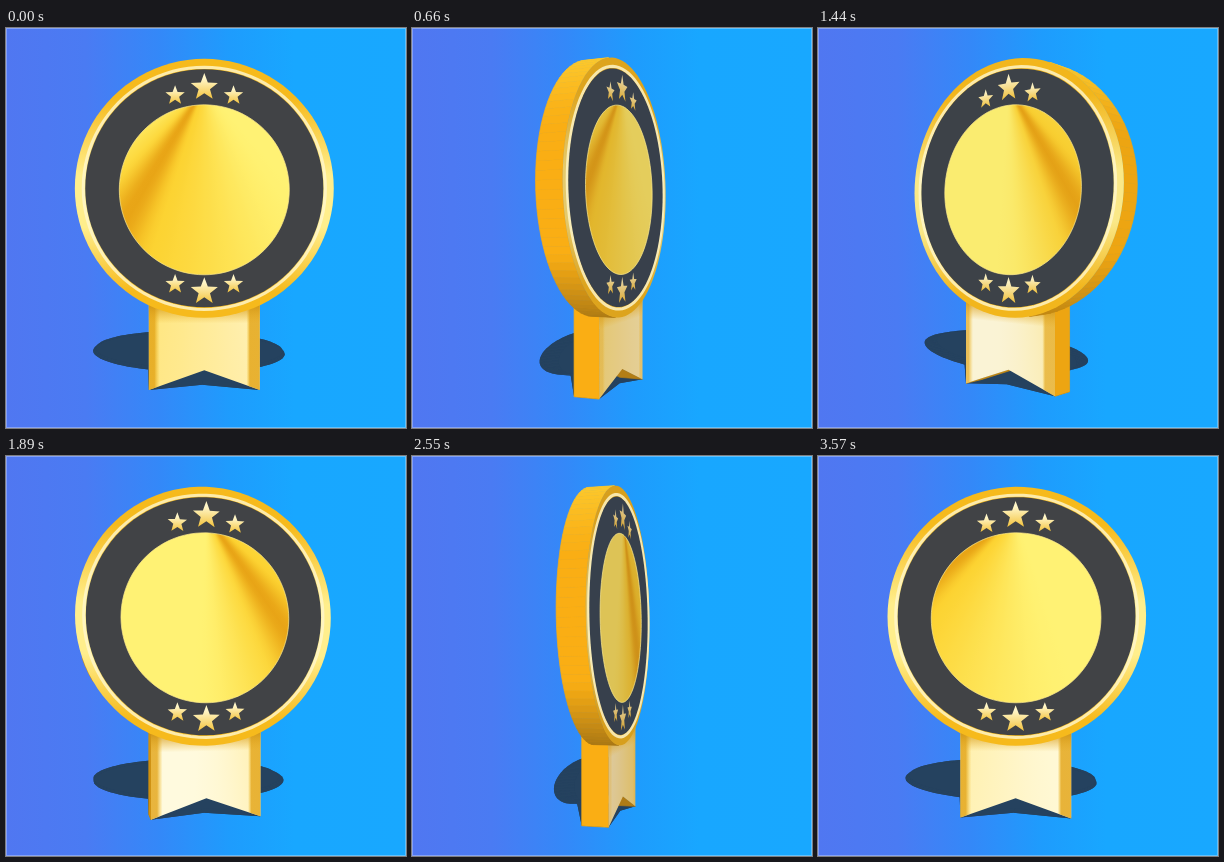
Write an HTML page with a canvas that moves like this. It is 400 px wide and 400 px high and loops after 3.6 s.

```html
<!DOCTYPE html>
<html lang="en">
<head>
<meta charset="utf-8">
<title>Turning medal</title>
<style>
  html, body { margin: 0; width: 100%; height: 100%; overflow: hidden; background: #18a7ff; }
  canvas { display: block; width: 400px; height: 400px; }
</style>
</head>
<body>
<canvas id="stage" width="400" height="400"></canvas>
<script>
const ctx = document.getElementById('stage').getContext('2d');
const LOOP = 3600, STEP = 30, TURN = 1800;
const AXIS = 198.3, HORIZON = 213, DEPTH = 745;
const HALF = 13, FLOOR = 359.4, MID = 161.2;
const RIM = 127.2, RING = 117, DISC = 83.5;
const POLE = 60, PERIOD = 165;
let sin = 0, cos = 1;

const rgb = c => `rgb(${c.map(Math.round).join()})`;
const mix = (a, b, k) => a.map((v, i) => v + (b[i] - v) * k);
const clamp = v => Math.min(1, Math.max(0, v));
const smooth = v => { v = clamp(v); return v * v * (3 - 2 * v); };

// Model point to world: turn around the vertical axis.
const turn = (x, y, z) => [x * cos + z * sin, y, z * cos - x * sin];

function project([x, y, z]) {
  const s = DEPTH / (DEPTH - z);
  return [AXIS + x * s, HORIZON + (y - HORIZON) * s];
}

// World point dropped along the light onto the floor.
function drop([x, y, z]) {
  const h = FLOOR - y;
  return [x - 0.115 * h, FLOOR, z - 1.4 * h];
}

const toScreen = (x, y, z) => project(turn(x, y, z));
const toShadow = (x, y, z) => project(drop(turn(x, y, z)));

function trace(pts) {
  ctx.beginPath();
  pts.forEach(p => ctx.lineTo(p[0], p[1]));
  ctx.closePath();
}

function area(pts) {
  return pts.reduce((sum, p, i) => {
    const q = pts[(i + 1) % pts.length];
    return sum + p[0] * q[1] - q[0] * p[1];
  }, 0);
}

function circle(r, cy = MID, n = 96) {
  return Array.from({ length: n }, (_, i) => {
    const a = i / n * 2 * Math.PI;
    return [r * Math.cos(a), cy + r * Math.sin(a)];
  });
}

function star(cx, cy, r) {
  return Array.from({ length: 10 }, (_, i) => {
    const a = i * Math.PI / 5 - Math.PI / 2, k = i % 2 ? r * 0.42 : r;
    return [cx + k * Math.cos(a), cy + k * Math.sin(a)];
  });
}

const rimShape = circle(RIM);
const ringShape = circle(RING);
const discShape = circle(DISC, MID + 1.5);
const ribbon = [[-54.5, 272], [54.5, 272], [54.5, FLOOR], [0, 340], [-54.5, FLOOR]];
const stars = [
  [-28.7, 70, 10], [0, 62, 14], [28.7, 70, 10],
  [-28.7, 255.5, 10], [0, 262.5, 14], [28.7, 255.5, 10]
];

const flat = (shape, z, map) => shape.map(p => map(p[0], p[1], z));

function eachWall(shape, map, draw) {
  shape.forEach((p, i) => {
    const q = shape[(i + 1) % shape.length];
    const quad = [map(...p, HALF), map(...p, -HALF), map(...q, -HALF), map(...q, HALF)];
    draw(quad, p, q);
  });
}

function castShadow(shape) {
  ctx.fillStyle = '#25425f';
  for (const z of [-HALF, HALF]) {
    trace(flat(shape, z, toShadow));
    ctx.fill();
  }
  eachWall(shape, toShadow, quad => { trace(quad); ctx.fill(); });
}

function drawWalls(shape) {
  const lit = mix([205, 142, 14], [250, 174, 20], smooth(Math.abs(sin) * 1.1));
  eachWall(shape, toScreen, (quad, p, q) => {
    if (area(quad) <= 0) return;
    const dx = q[0] - p[0], dy = q[1] - p[1];
    const down = -dx / Math.hypot(dx, dy);
    const upper = mix(lit, [252, 200, 44], smooth((-down - 0.3) * 1.4));
    ctx.fillStyle = ctx.strokeStyle = rgb(mix(upper, [140, 100, 22], clamp((down - 0.5) * 1.6) * Math.abs(sin)));
    ctx.lineWidth = 0.7;
    trace(quad);
    ctx.fill();
    ctx.stroke();
  });
}

// Run a paint job with coordinates lying on the front face.
function onFace(cy, paint) {
  const at = (x, y) => toScreen(x, y, HALF);
  const o = at(0, cy), l = at(-40, cy), r = at(40, cy), t = at(0, cy - 40), b = at(0, cy + 40);
  ctx.save();
  ctx.transform((r[0] - l[0]) / 80, (r[1] - l[1]) / 80,
    (b[0] - t[0]) / 80, (b[1] - t[1]) / 80, o[0], o[1]);
  paint();
  ctx.restore();
}

function addStops(g, stops) {
  stops.forEach(([at, color]) => g.addColorStop(at, color));
  return g;
}

const ramp = (x0, y0, x1, y1, stops) =>
  addStops(ctx.createLinearGradient(x0, y0, x1, y1), stops);

// Dark streaks that sweep around a point above the disc.
function sheen(cy, sweep, [dark, gold, light]) {
  const n = 72, stops = [];
  for (let i = 0; i <= n; i++) {
    const raw = 90 - i / n * 180 - sweep;
    const d = raw - PERIOD * Math.round(raw / PERIOD);
    const near = smooth(Math.abs(d) / 14), far = smooth(Math.abs(d) / (d < 0 ? 40 : 75));
    stops.push([i / n / 2, rgb(mix(mix(dark, gold, near), light, far))]);
  }
  return addStops(ctx.createConicGradient(0, 0, POLE - cy), stops);
}

function fillFace(shape, cy, style) {
  trace(flat(shape, HALF, toScreen));
  onFace(cy, () => { ctx.fillStyle = style(); ctx.fill(); });
}

const dim = c => mix(c, [158, 108, 30], 0.4 * sin ** 4);

function drawRibbon(sweep) {
  const tone = [[232, 176, 40], [255, 226, 112], [255, 250, 222]].map(dim);
  fillFace(ribbon, 318, () => sheen(318, sweep, tone));
  const edge = `rgba(226,162,18,${0.8 * cos})`, none = 'rgba(240,190,40,0)';
  fillFace(ribbon, 318, () => ramp(-54.5, 0, 54.5, 0,
    [[0, edge], [0.05, edge], [0.1, none], [0.88, none], [0.91, edge], [1, edge]]));
  fillFace(ribbon, 318, () => ramp(0, -42, 0, -24,
    [[0, 'rgba(206,146,18,.8)'], [1, 'rgba(230,170,30,0)']]));
}

function drawFace(sweep) {
  const [gold, cream] = [[246, 186, 28], [255, 238, 140]].map(c => rgb(dim(c)));
  fillFace(rimShape, MID, () => ramp(0, -RIM, 0, RIM,
    [[0, gold], [0.15, gold], [0.45, cream], [0.65, cream], [0.9, gold], [1, gold]]));
  trace(flat(circle(119), HALF, toScreen));
  ctx.lineWidth = 3;
  ctx.strokeStyle = 'rgba(255,248,205,.8)';
  ctx.stroke();

  trace(flat(ringShape, HALF, toScreen));
  ctx.fillStyle = rgb(mix([65, 67, 70], [54, 64, 76], sin * sin));
  ctx.fill();

  const tone = [[232, 164, 22], [252, 208, 44], [255, 242, 116]].map(dim);
  fillFace(discShape, MID + 1.5, () => sheen(MID, sweep, tone));
  trace(flat(discShape, HALF, toScreen));
  ctx.lineWidth = 1;
  ctx.strokeStyle = 'rgba(255,236,140,.7)';
  ctx.stroke();

  const [pale, deep] = [[255, 246, 200], [244, 196, 62]].map(c => rgb(dim(c)));
  for (const [x, y, r] of stars)
    fillFace(star(x, y, r), y, () => ramp(0, -r, 0, r, [[0.2, pale], [0.9, deep]]));
}

function drawBackground() {
  ctx.fillStyle = ramp(0, 0, 400, 0, [
    [0, '#5077f1'], [0.2, '#4a7bf3'], [0.38, '#3488f8'],
    [0.56, '#1e9cfd'], [0.72, '#18a7ff'], [1, '#18a8ff']
  ]);
  ctx.fillRect(0, 0, 400, 400);
  ctx.lineWidth = 1;
  ctx.strokeStyle = 'rgba(255,255,255,.3)';
  ctx.strokeRect(0.5, 0.5, 399, 399);
}

function draw(ms) {
  const t = Math.floor(ms % LOOP / STEP) * STEP;
  const deg = (t / TURN * 180 + 90) % 180 - 90;
  sin = Math.sin(deg * Math.PI / 180);
  cos = Math.cos(deg * Math.PI / 180);
  const sweep = -31 + deg * PERIOD * 8 / 180;
  const facing = cos * DEPTH > HALF;

  drawBackground();
  castShadow(rimShape);
  castShadow(ribbon);
  drawWalls(ribbon);
  if (facing) drawRibbon(sweep);
  drawWalls(rimShape);
  if (facing) drawFace(sweep);
}

const start = performance.now();
function tick() {
  draw(performance.now() - start);
  requestAnimationFrame(tick);
}
tick();
</script>
</body>
</html>
```
